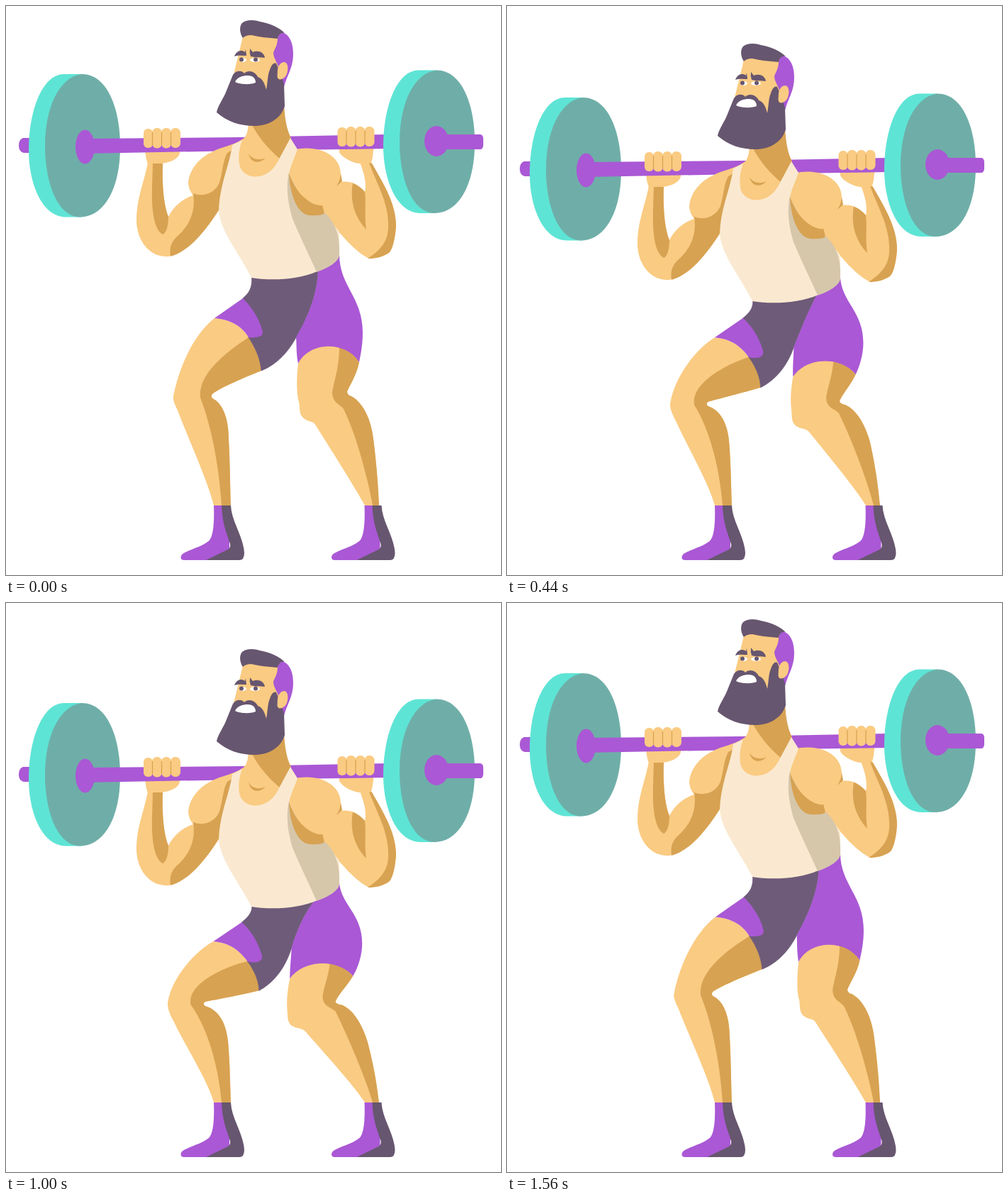
Animation of 698 by 802 pixels, one loop 1.6 s. Source, as an HTML page:

```html
<!DOCTYPE html>
<html lang="en">
<head>
<meta charset="utf-8">
<title>Squat</title>
<style>
html, body { margin: 0; width: 100%; height: 100%; overflow: hidden; background: #fff; }
svg { display: block; width: 100vw; height: 100vh; }
.skin { fill: #facb82; } .shade { fill: #d7a252; }
.purple { fill: #aa58d5; } .dark { fill: #67566f; }
.short { fill: #6e5b79; stroke: #6e5b79; stroke-width: .8; }
.teal { fill: #5ee4d5; } .plate { fill: #6faea8; }
.tank { fill: #fae9d0; } .fold { fill: #d6c7ab; } .white { fill: #fff; }
.line { fill: none; stroke: #d7a252; stroke-width: 1.2; }
</style>
</head>
<body>
<svg viewBox="0 0 698 802">
  <defs>
    <g id="disc">
      <path class="teal" d="M82 96H107V297.500H84C50 297 32 249 32 203C32 150 50 96 82 96Z"/>
      <path class="plate" d="M107 96C143 96 161 145 161 198C161 258 138 297.500 104 297.500C72 297 55 248 55 197C55 145 74 100 107 96Z"/>
    </g>
    <g id="foot">
      <path class="purple" d="M293 704H315V776L290 781H251C245 781 245 774 251 771C262 765 276 762 286 754C292 748 294 730 293 704Z"/>
      <path class="dark" d="M304 704H317C318 727 335 748 336 771Q336 781 329 781H282L313 766Q317 764 316 758C311 742 305 730 304 704Z"/>
    </g>
    <g id="grip">
      <rect class="skin" x="194" y="173" width="13" height="27" rx="6"/>
      <rect class="skin" x="206" y="172" width="14" height="28.500" rx="6.500"/>
      <rect class="skin" x="219" y="172" width="14" height="28.500" rx="6.500"/>
      <rect class="skin" x="232" y="172" width="14" height="28" rx="6.500"/>
      <path class="line" d="M206.500 178V196M219.500 178V196M232.500 178V196"/>
    </g>
  </defs>

  <g id="legs"></g>
  <use href="#foot"/>
  <use href="#foot" x="212.500"/>

  <g id="body">
    <!-- palms sit behind the bar, fingers in front -->
    <path class="skin" d="M194.500 195C197 208 197 216 200 222H216C230 222 245 215 245 206V195Z"/>
    <path class="skin" d="M470 190V206C474 214 490 222 500 222H514C517 218 518 205 519 190Z"/>

    <path class="purple" d="M24 186H40V207H25Q18 205 18 197Q18 188 24 186Z"/>
    <use href="#disc"/>
    <path class="purple" d="M112 187L330 185L540 181V201L330 204L112 208Z"/>
    <ellipse class="purple" cx="111.500" cy="198.500" rx="13.500" ry="24"/>
    <use href="#disc" x="500" y="-5.500"/>
    <path class="purple" d="M610 181H669Q673 182 673 187V197Q672 202 669 202H610Z"/>
    <ellipse class="purple" cx="607" cy="190.500" rx="17" ry="21.500"/>
    <use href="#grip"/>
    <use href="#grip" x="273.500" y="-2"/>

    <!-- left arm -->
    <path class="skin" d="M200 220C196 245 184 270 184 302C184 328 200 352 224 353Q230 354 234 351C260 343 288 308 304 282L330 230L333 188C320 197 304 198 290 206C274 213 258 230 257 250Q258 260 264 267C248 272 236 283 229 297C222 280 220 250 221 220Z"/>
    <path class="shade" d="M207 222H221C220 250 222 280 229 297C229 310 226 320 221 322C208 315 205 285 206 255Z"/>
    <path class="shade" d="M232 353C230 340 234 332 240 326C258 311 268 290 264 264C282 271 299 260 302 245C306 230 306 218 312 207L324 200L303 282C286 312 258 347 232 353Z"/>

    <!-- right arm -->
    <path class="skin" d="M404 203C440 194 472 210 472 237L473 248C486 246 498 252 506 262C509 248 504 234 499 220H515C530 247 550 277 550 310C549 325 546 340 541 347C532 354 520 356 512 356C490 345 468 318 449 292L410 280L396 236Z"/>
    <path class="shade" d="M472 236L474 247L466 254Q472 244 472 236Z"/>
    <path class="shade" d="M489 249.500Q499 254 506 262C508 276 505 295 508 315C490 296 485 273 489 249.500Z"/>
    <path class="shade" d="M512 221L516 222C530 247 550 277 550 310C549 325 546 340 541 347C532 354 520 356 510 356C535 340 540 325 539 305C538 275 522 248 512 221Z"/>

    <!-- neck and chest -->
    <path class="skin" d="M342 160C342 178 338 186 333 188L322 200V245H380L386 214L391 140Z"/>
    <path class="shade" d="M346 166L392 138C393 158 396 175 402 186L386 215C371 203 355 184 346 166Z"/>
    <path class="shade" d="M342 208C347 217 358 218 366 214C358 223 345 222 342 208Z"/>

    <!-- vest -->
    <path class="tank" d="M333 189L319 196C316 222 301 252 300 288C302 318 330 350 346 383C370 387 410 387 439 374L470 351V318L449 292C430 297 402 285 399 237C402 222 408 212 411 202L401 186L386 214C381 225 374 234 364 238C352 243 336 241 330 227C327 216 328 202 333 189Z"/>
    <path class="fold" d="M399 234C394 256 398 280 404 300C415 326 427 350 438 375C452 370 468 362 470 352C471 330 468 308 449 291L425 292Z"/>
    <path class="shade" d="M399 236C400 262 409 293 428 295Q445 296 449 292L446 280C424 280 408 261 399 236Z"/>
    <path class="skin" d="M399 236C410 262 428 283 447 281L449 292L452 292L463 268L450 240Z"/>

    <!-- head -->
    <path class="skin" d="M334 43L346 39L386 44L384 86L386 105L366 122L324 112L321 96L328 68Z"/>
    <path class="purple" d="M389 37C400 40 405 52 405 68C405 87 396 98 392 114L386 92C384 81 377 74 377 66C379 60 383 55 383 46Q384 39 389 37Z"/>
    <path class="dark" d="M334 45C329 38 329 28 333 24C338 19 350 19 358 22C374 25 386 31 393 38C386 37 384 42 383 46C368 45 354 43 346 41Q338 41 334 45Z"/>
    <path class="dark" d="M320 97C324 91 332 90 336 95C342 89 352 93 355 100C362 102 365 110 367 118C369 108 369 96 372 90C374 84 377 79 381 81L385 90L392 110L393 141C388 159 370 169 350 169C330 169 312 163 297 150C298 143 305 132 309 124Z"/>
    <path class="skin" d="M383 90C384 82 389 79 393 79C399 81 398 92 395 98C391 104 383 106 382.500 99Z"/>
    <path class="white" d="M323 107C326 100 334 98 341 98C348 98 352 102 352 108C346 111 330 111 323 107Z"/>
    <ellipse class="white" cx="334" cy="76" rx="5" ry="3"/>
    <ellipse class="white" cx="351" cy="76" rx="7" ry="3"/>
    <circle class="dark" cx="332" cy="75.500" r="3"/>
    <circle class="dark" cx="352" cy="75.500" r="3"/>
    <path class="dark" d="M322 71C325 63 332 61 337 65L338 61L339 70C334 70 327 69 322 71Z"/>
    <path class="dark" d="M344 60L348 65C355 62 364 65 365 73C358 72 352 73 345 71Q343 66 344 60Z"/>
  </g>
</svg>
<script>
const LOOP = 1600, STEP = 40, DEPTH = 60, LOW = 57;

// "a|b" is a coordinate standing tall (a) and squatting (b)
const hem = "C318|315 442|489 334|328 453|500 342|340 467|515";
const inner = "C354|352 485|530 359|356 500|545 360|356 514|555";
const cuff = "C425|418 472|508 480|465 470|507 498|487 502|532";
const calfL = "C335|332 524|560 305|300 537|564 292|279 546|566Q288|273 549|568 291|278 553|572" +
  "C306|298 560|577 314|310 582|594 314|313 610|622C316 645|655 316 680 317 704";
const calfR = "C494|477 522|545 484|465 535|555 481|460 544|567Q482|462 549|570 487|470 550|571" +
  "C505|490 560|578 515|505 585|610 518|510 610|630C523|520 650|665 525|523 680|685 526 704";
const seam = "C425|406 440|468 440|415 405|445 440|437 370|429";

const shapes = [
  ["skin", `M294|292 440|487${hem}${inner}${calfL}H293C285 670|675 255|250 605|625 242|235 570|595` +
    "C238|228 562|583 235|225 555|572 236|226 550|567C243|230 512|535 264|265 463|500 294|292 440|487Z"],
  ["shade", `M342|340 467|515${inner}${calfL}H304C300 640|660 287|285 585|605 274|257 552|570` +
    "C270|250 515|545 320|300 482|522 342|340 467|515Z"],
  ["skin", `M412|397 504|536${cuff}${calfR}H506C490 675|680 455|440 620|630 436|418 590|607` +
    "C432|412 584|603 428|408 587|604 421|401 582|601C412|391 576|597 415|393 566|585 413|392 558|575" +
    "C409|392 545|560 410|394 520|550 412|397 504|536Z"],
  ["shade", `M470|453 481|516Q486|472 484|517 498|487 502|532${calfR}H517` +
    "C510|506 665|670 494|482 604|620 476|462 568|578C470|455 560|572 461|445 560|572 460|443 545|560" +
    "C462|442 530|550 470|450 510|535 470|453 481|516Z"],
  ["short", "M345 370|427C349 392|440 346|348 402|448 334|332 412|460L342|340 467|515" +
    `${inner}C385|378 504|542 400|393 484|520 409|401 467|491${seam}Z`],
  ["purple", `M294|292 440|487${hem}Q346|345 468|517 350 467|517Q362|361 467|517 362|361 460|508` +
    "C359|356 445|490 350|346 428|472 334|332 412|460Z"],
  ["purple", "M470 350|407C470|474 395|434 503|502 410|446 503|502 460|485C503|502 478|505 500|493 492|524 498|487 502|532" +
    `C480|465 472|509 428|418 472|510 412|397 504|536C409|398 490|520 410|400 478|505 409|401 467|491${seam}Z`]
];

const body = document.getElementById("body");
const legs = document.getElementById("legs");
const parts = shapes.map(([name, path]) => {
  const el = document.createElementNS("http://www.w3.org/2000/svg", "path");
  el.setAttribute("class", name);
  legs.append(el);
  return { el, path };
});

const morph = (path, k) =>
  path.replace(/([\d.]+)\|([\d.]+)/g, (_, a, b) => (+a + (b - a) * k).toFixed(2));

function draw(time) {
  const t = Math.floor((time % LOOP) / STEP) * STEP;
  const drop = DEPTH * (1 - Math.abs(1 - t / (LOOP / 2)));
  body.setAttribute("transform", `translate(0 ${drop})`);
  for (const { el, path } of parts) el.setAttribute("d", morph(path, drop / LOW));
}

const start = performance.now();
function tick() {
  draw(performance.now() - start);
  requestAnimationFrame(tick);
}
draw(0);
requestAnimationFrame(tick);
</script>
</body>
</html>
```
